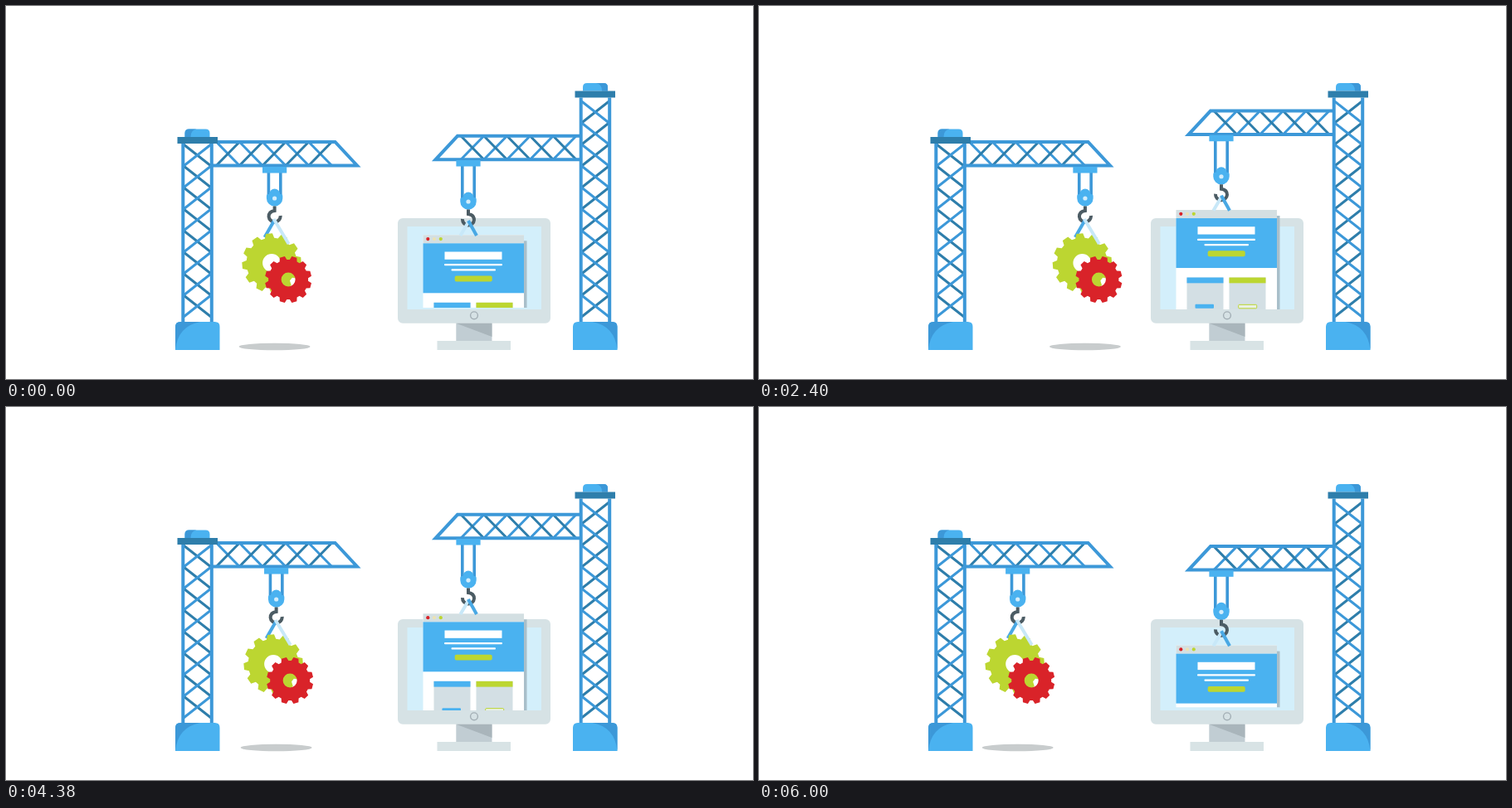
Write an HTML page that moves like this. It is 900 px wide and 450 px high and loops after 7140 ms.

```html
<!DOCTYPE html>
<html lang="en">
<head>
<meta charset="utf-8">
<title>Cranes</title>
<style>
  html, body { margin: 0; width: 100%; height: 100%; overflow: hidden; background: #fff; }
  svg { display: block; width: 100vw; height: 100vh; }
</style>
</head>
<body>
<svg id="stage" viewBox="0 0 900 450"></svg>
<script>
const SKY = '#4ab2f0', BLUE = '#3c98d8', DEEP = '#2e7eab', PALE = '#c8e8f8',
      GREY = '#d6e2e5', LIME = '#bcd631', RED = '#d92329', IRON = '#4c5c64';
const LOOP = 7140, STEP = 20;

const rect = (x, y, w, h, fill, rx = 0) =>
  `<rect x="${x}" y="${y}" width="${w}" height="${h}" rx="${rx}" fill="${fill}"/>`;
const circle = (x, y, r, fill) => `<circle cx="${x}" cy="${y}" r="${r}" fill="${fill}"/>`;
const shape = (d, fill) => `<path d="${d}" fill="${fill}" fill-rule="evenodd"/>`;
const line = (d, color, w) => `<path d="${d}" fill="none" stroke="${color}" stroke-width="${w}"/>`;
const group = (id, body, extra = '') => `<g id="${id}" ${extra}>${body}</g>`;
const mirror = (axis, body) => `<g transform="translate(${axis} 0) scale(-1 1)">${body}</g>`;

// Crossed braces: n cells of size w by h, stepping by (dx, dy).
function braces(x, y, w, h, dx, dy, n, rising, falling) {
  let up = '', down = '';
  for (let i = 0; i < n; i++) {
    const px = x + i * dx, py = y + i * dy;
    up += `M${px} ${py + h}l${w} ${-h}`;
    down += `M${px} ${py}l${w} ${h}`;
  }
  return line(down, falling, 3) + line(up, rising, 3);
}

// Tower standing at the left, its cap bottom at `top`.
function tower(top, cells) {
  return braces(214, 375 - cells * 26, 33, 26, 0, 26, cells, BLUE, DEEP) +
    line(`M213.3 ${top}V382M247.8 ${top}V382`, BLUE, 4) +
    shape(`M215.5 ${top - 8}v-4.5q0-5 5-5h20q5 0 5 5v4.5z`, SKY) +
    shape(`M215.5 ${top - 8}v-4.5q0-5 5-5h9q-7 1-7 9.5z`, BLUE) +
    rect(206.5, top - 8, 48.5, 8, DEEP) +
    shape('M204 415V387q0-6 6-6H251.500q6 0 6 6V415z', SKY) +
    shape('M204 415V387q0-6 6-6H234Q207 386 204 415z', BLUE);
}

// Left-hand jib; y is the centre of the top beam.
const jib = y => braces(253.5, y, 27.8, 28.5, 27.8, 0, 5, DEEP, BLUE) +
  line(`M249 ${y}H396.500L423 ${y + 28.5}H249`, BLUE, 4);

// Hoist around the pulley axle; `drop` is the trolley's distance above it.
const hoist = (drop, side) =>
  line(`M-7.2 ${-drop + 5}V-1M7.2 ${-drop + 5}V-1`, BLUE, 3.6) +
  rect(-14.6, -drop, 29.2, 7.5, SKY) +
  circle(0, -5, 6.5, SKY) +
  shape('M-9.7-3q0-2 2-2H7.700q2 0 2 2V0a9.700 9.700 0 0 1-19.400 0z', SKY) +
  circle(0, 0, 2.6, '#d3edfb') +
  `<g transform="scale(${side} 1)">` +
  line('M0 9.500V15Q-7 16-7 22A7 7 0 0 0 7 21', IRON, 4) + '</g>';

function gear(cx, cy, inner, outer, hole, n, phase) {
  const pts = [], pitch = 2 * Math.PI / n;
  const add = (r, a) => pts.push(
    (cx + r * Math.cos(a)).toFixed(2) + ' ' + (cy + r * Math.sin(a)).toFixed(2));
  for (let i = 0; i < n; i++) {
    const a = phase * Math.PI / 180 + i * pitch;
    add(inner, a - pitch * .36);
    add(outer, a - pitch * .21);
    add(outer, a + pitch * .21);
    add(inner, a + pitch * .36);
  }
  return `M${pts.join('L')}zM${cx - hole} ${cy}` +
    `a${hole} ${hole} 0 1 0 ${hole * 2} 0a${hole} ${hole} 0 1 0 ${-hole * 2} 0z`;
}

const load = `<ellipse cx="0" cy="411" rx="43" ry="4.300" fill="#c8cccd"/>` +
  `<g transform="translate(0 232)">${hoist(38, 1)}</g>` +
  line('M0 258L-12 279', '#49a8e4', 4) +
  shape(gear(-3.5, 310, 30.5, 35.8, 11, 12, -95), LIME) +
  line('M-1 257L17 287', PALE, 4) +
  shape(gear(16.5, 330, 24, 28.2, 8.5, 12, 75), RED);

// Web page, its origin at the top of the title bar.
const card = (x, color) => rect(x, 81.5, 44, 41, '#d3dfe4') + rect(x, 81.5, 44, 6.8, color);
const page = rect(624, 7, 3.5, 150, '#a9bfca') +
  rect(502.5, 0, 121.5, 157, '#fff') +
  rect(502.5, 0, 121.5, 10, '#d3dfe2') +
  circle(508.3, 4.8, 2.1, RED) + circle(516, 4.8, 2.1, '#ece2b4') + circle(523.8, 4.8, 2.1, LIME) +
  rect(502.5, 10, 121.5, 60, SKY) +
  rect(528.5, 20.2, 69, 9.3, '#fff') +
  rect(528, 34.6, 70, 2.3, '#fff', 1) + rect(536.5, 41, 53.5, 2.2, '#fff', 1) +
  rect(540.7, 49.3, 45, 6.8, LIME, 2) +
  card(515.5, SKY) + card(566.5, LIME) +
  rect(525.5, 113.8, 22.5, 5, SKY, 1) +
  `<rect x="577.700" y="114.300" width="22" height="4.500" rx="1" fill="#e9f0e4" stroke="${LIME}"/>`;

const monitor = rect(472, 256, 184, 126.7, GREY, 6) +
  rect(483.5, 266, 161.5, 100, '#d3effb') +
  rect(542.3, 382.7, 43.2, 22, '#c1cdd3') +
  shape('M542.300 382.700H585.500V399z', '#a9b5bb') +
  rect(519.5, 404, 88.5, 11, '#d8e3e5') +
  '<circle cx="564" cy="373.300" r="4.400" fill="none" stroke="#a3afb5" stroke-width="1.400"/>';

const sling = line('M1-17L-9.500 1', PALE, 4) + line('M0-17L10 1', '#49a8e4', 4);

document.getElementById('stage').innerHTML =
  '<defs><clipPath id="glass"><rect id="pane" x="480" y="0" width="170" height="366"/></clipPath></defs>' +
  rect(0, 0, 900, 450, '#fff') +
  jib(164) + tower(166, 8) +
  group('load', load) +
  monitor +
  group('site', group('page', page), 'clip-path="url(#glass)"') +
  group('lift', mirror(940.5, jib(156.8)) +
    `<g transform="translate(557 236)">${hoist(50, -1)}</g>` +
    `<g transform="translate(557 276)">${sling}</g>`) +
  mirror(940.5, tower(110.5, 10));

const part = id => document.getElementById(id);
const loadEl = part('load'), liftEl = part('lift'), pageEl = part('page'), pane = part('pane');

// Linear travel through [time, value] stops, holding the last one.
function travel(t, stops) {
  for (let i = 1; i < stops.length; i++) {
    const [t0, a] = stops[i - 1], [t1, b] = stops[i];
    if (t < t1) return a + (b - a) * (t - t0) / (t1 - t0);
  }
  return stops[stops.length - 1][1];
}

function draw(ms) {
  const t = Math.floor(ms % LOOP / STEP) * STEP;
  const x = travel(t, [[0, 323.6], [2360, 394.3], [4790, 311.7]]);
  const y = travel(t, [[0, 0], [3600, -45.4], [6000, 11.3]]);
  loadEl.setAttribute('transform', `translate(${x} 0)`);
  liftEl.setAttribute('transform', `translate(0 ${y})`);
  pageEl.setAttribute('transform', `translate(0 ${276.3 + y})`);
  pane.setAttribute('height', Math.min(366, 364 - y * .15));
}

const start = performance.now();
function tick() {
  draw(performance.now() - start);
  requestAnimationFrame(tick);
}
tick();
</script>
</body>
</html>
```
